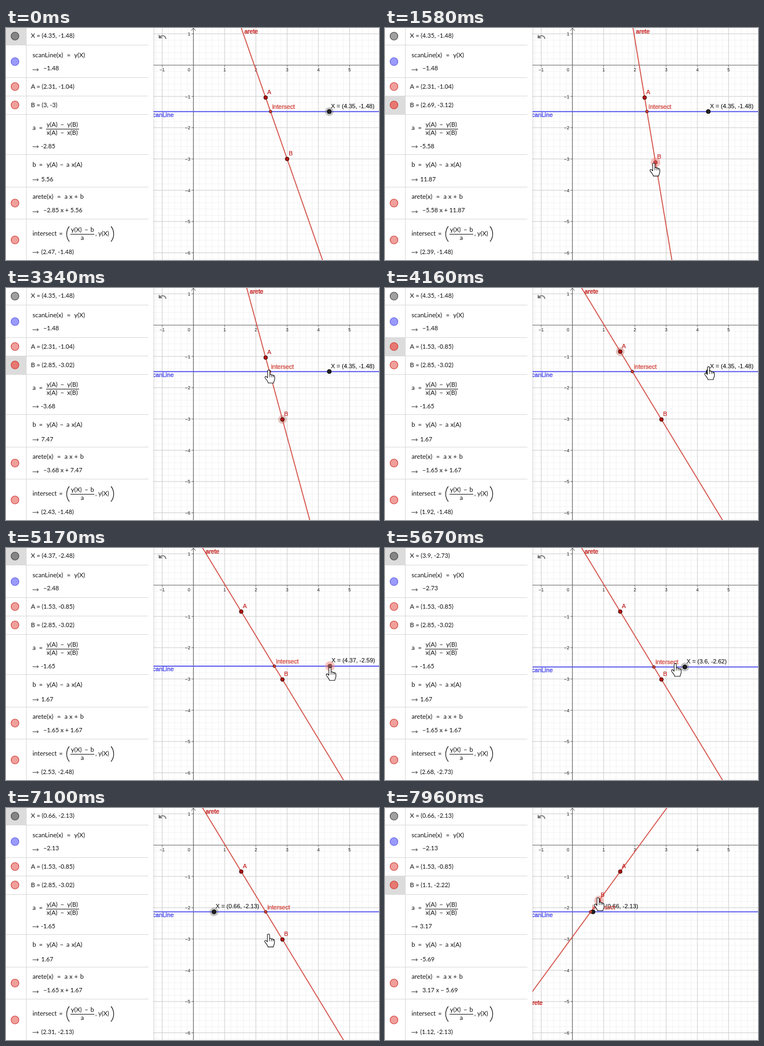
Animation of 689x428 px, one loop 8000 ms. Source, as an HTML page:

```html
<!DOCTYPE html>
<html lang="en">
<head>
<meta charset="utf-8">
<title>Scan line</title>
<style>
html, body { margin: 0; width: 100%; height: 100%; overflow: hidden; background: #fff; }
svg { display: block; width: 689px; height: 428px; }
.tick { font: 8.5px "Liberation Sans", Arial, sans-serif; fill: #222; }
.label { font: 11.1px "Liberation Sans", Arial, sans-serif; }
.math { font: 11.7px Lato, "Open Sans", sans-serif; fill: #111; }
.value { font-size: 11.3px; }
</style>
</head>
<body>
<svg id="stage" viewBox="0 0 689 428"></svg>
<script>
const LOOP = 8000, STEP = 83.6, UNIT = 57.7, OX = 346.2, OY = 68.5, LEFT = 261;
const W = 689, H = 428;
const stage = document.getElementById('stage');

function el(tag, attrs, parent = stage) {
  const node = document.createElementNS('http://www.w3.org/2000/svg', tag);
  for (const k in attrs) node.setAttribute(k, attrs[k]);
  parent.appendChild(node);
  return node;
}
function set(node, attrs) { for (const k in attrs) node.setAttribute(k, attrs[k]); }
function line(x1, y1, x2, y2, stroke, width = 1) {
  return el('line', { x1, y1, x2, y2, stroke, 'stroke-width': width });
}
function text(cls, x, y, str = '', attrs = {}) {
  const node = el('text', { class: cls, x, y, ...attrs });
  node.textContent = str;
  return node;
}
function path(d, stroke, width, fill = 'none', parent = stage) {
  return el('path', { d, stroke, 'stroke-width': width, fill, 'stroke-linejoin': 'round' }, parent);
}
const px = p => ({ x: OX + p.x * UNIT, y: OY - p.y * UNIT });
const num = v => String(+v.toFixed(2));
const minus = s => s.replace('-', '−');
const pair = p => `(${num(p.x)}, ${num(p.y)})`;

// ---- motion: [step, x, y] ----
const tracks = {
  A: [[41, 2.3122, -1.0375], [44, 1.9, -0.93], [47, 1.5305, -0.8455]],
  B: [[11, 3, -3], [18, 2.6853, -3.12], [19, 2.66, -3.11], [20, 2.615, -3.13],
      [24, 2.58, -3.15], [29, 2.62518, -3.1445], [30, 2.685, -3.11], [31, 2.773, -3.07],
      [36, 2.85, -3.0167], [86, 2.85, -3.0167], [89, 2.55, -3.05], [91, 2, -2.95],
      [92, 1.72, -2.8], [93, 1.38, -2.52], [94, 1.098, -2.2154], [95, 0.85, -1.774], [96, 0.83, -1.68]],
  X: [[53, 4.35, -1.484], [61, 4.37, -2.484], [62, 4.37, -2.59], [63, 4.38, -2.63],
      [66, 4.2, -2.85], [69, 3.3, -2.5], [73, 2.19, -2.1], [74, 2.19, -2.1],
      [75, 1.906, -2.097], [80, 0.66, -2.133]]
};
const approach = [[0, 526, 445], [1, 526, 415], [6, 522, 250], [8, 520, 216], [9, 521, 240], [11, 519, 243]];
const drags = [['B', 11, 36], ['A', 41, 47], ['X', 52, 81], ['B', 86, 97]];
const picks = [[0, 'X'], [12, 'B'], [41, 'A'], [52, 'X'], [86, 'B']];

function at(keys, f) {
  if (f <= keys[0][0]) return { x: keys[0][1], y: keys[0][2] };
  for (let i = 1; i < keys.length; i++) {
    const [f1, x1, y1] = keys[i], [f0, x0, y0] = keys[i - 1];
    if (f <= f1) {
      const k = (f - f0) / (f1 - f0);
      return { x: x0 + (x1 - x0) * k, y: y0 + (y1 - y0) * k };
    }
  }
  const end = keys[keys.length - 1];
  return { x: end[1], y: end[2] };
}
const mix = (a, b, k) => ({ x: a.x + (b.x - a.x) * k, y: a.y + (b.y - a.y) * k });
const dragAt = f => drags.find(d => f >= d[1] && f <= d[2]);

// The hand runs one step ahead of the point it drags.
function handAt(f) {
  if (f < 11) return at(approach, f);
  const d = dragAt(f);
  if (d) return px(at(tracks[d[0]], f + 1));
  const i = drags.findIndex(g => g[1] > f);
  const [n0, , f0] = drags[i - 1], [n1, f1] = drags[i];
  const from = px(at(tracks[n0], f0)), to = px(at(tracks[n1], f1));
  if (n1 === 'X') {
    const k = Math.min(1, (f - f0) / 3);
    return mix(from, { x: 598, y: 145 }, k);
  }
  return mix(from, to, (f - f0) / (f1 - f0));
}
function solve(f) {
  const s = { A: at(tracks.A, f), B: at(tracks.B, f), X: at(tracks.X, f) };
  s.a = (s.A.y - s.B.y) / (s.A.x - s.B.x);
  s.b = s.A.y - s.a * s.A.x;
  s.I = { x: (s.X.y - s.b) / s.a, y: s.X.y };
  return s;
}

// ---- graph ----
el('rect', { width: W, height: H, fill: '#fff' });
for (let i = -7; i <= 32; i++) {
  const x = OX + i * UNIT / 5, y = OY + i * UNIT / 5;
  if (i % 5 === 0) continue;
  line(x, 0, x, H, '#f2f2f2');
  line(LEFT, y, W, y, '#f2f2f2');
}
for (let i = -1; i <= 6; i++) {
  const x = OX + i * UNIT, y = OY + i * UNIT;
  line(x, 0, x, H, '#cbcbcb');
  line(LEFT, y, W, y, '#cbcbcb');
}
line(OX, 0, OX, H, '#555');
line(LEFT, OY, W, OY, '#666');
path(`M${OX - 4} 5L${OX} 0L${OX + 4} 5`, '#555', 1);
for (let i = -1; i <= 6; i++) {
  const x = OX + i * UNIT, y = OY + i * UNIT;
  if (!i) continue;
  line(x, OY, x, OY + 3, '#666');
  line(OX - 3, y, OX, y, '#666');
  if (i < 6) text('tick', x, 80, minus(String(i)), { 'text-anchor': 'middle' });
  text('tick', 340.5, y + 3.3, minus(String(-i)), { 'text-anchor': 'end' });
}
text('tick', 340.5, 80, '0', { 'text-anchor': 'end' });

const RED = '#d5554d', DARK = '#c3201f', BLUE = '#4c4cec';
const scan = line(LEFT, 0, W, 0, '#5c5cf0', 2);
const edge = line(0, 0, 0, 0, RED, 1.8);
const halo = el('circle', { r: 8 });
function dot(r, fill, stroke) { return el('circle', { r, fill, stroke, 'stroke-width': 1 }); }
const dots = {
  X: dot(3.8, '#222', '#000'),
  A: dot(3.5, '#b31414', '#300'),
  B: dot(3.5, '#b31414', '#300'),
  I: dot(2.6, '#d8443c', '#501010')
};
function label(str, fill, weight) { return text('label', 0, 0, str, { fill, stroke: fill, 'stroke-width': weight }); }
const labels = {
  X: label('', '#111', .1), A: label('A', DARK, .2), B: label('B', DARK, .2), I: label('intersect', RED, .45),
  scan: label('scanLine', BLUE, .45), edge: label('arete', DARK, .45)
};
const press = el('circle', { r: 9, fill: '#f0807a', 'fill-opacity': .5 });

path('M282 12V19H289Z', 'none', 0, '#777');
path('M284 17C288 12.5 294 13.5 295.5 20', '#777', 2);

// ---- side panel ----
const fade = el('linearGradient', { id: 'fade' }, el('defs', {}));
el('stop', { offset: 0, 'stop-color': '#000', 'stop-opacity': .2 }, fade);
el('stop', { offset: 1, 'stop-color': '#000', 'stop-opacity': 0 }, fade);
el('rect', { x: 272, width: 3, height: H, fill: 'url(#fade)' });
el('rect', { width: 272.5, height: H, fill: '#fff' });

const cells = {};
function cell(name, y, h) { cells[name] = el('rect', { y, width: 37, height: h, fill: '#dcdcdc' }); }
cell('X', 0, 31);
cell('A', 91, 34);
cell('B', 125, 34);
for (const y of [31, 91, 125, 159, 233, 293, 352]) line(0, y + .5, 263, y + .5, '#d8d8d8');
line(37.5, 0, 37.5, H, '#d8d8d8');

function marble(y, fill, stroke) { return el('circle', { cx: 16.6, cy: y, r: 7.2, fill, stroke, 'stroke-width': 1.1 }); }
const marbles = { X: marble(15, '#a0a0a0', '#444') };
marble(62, '#9a9aff', '#5c5ce0');
marbles.A = marble(108, '#f0a09c', '#cf3832');
marbles.B = marble(142, '#f0a09c', '#cf3832');
marble(323, '#f0a09c', '#cf3832');
marble(391, '#f0a09c', '#cf3832');
const tone = { X: ['#a0a0a0', '#858585'], A: ['#f0a09c', '#e67972'], B: ['#f0a09c', '#e67972'] };

// Places alternating x positions and strings on one baseline.
function row(y, ...parts) {
  for (let i = 0; i < parts.length; i += 2) text('math', parts[i], y, parts[i + 1]);
}
function arrow(y) { path(`M49 ${y}H60M57 ${y - 2.3}L60 ${y}L57 ${y + 2.3}`, '#333', 1); }
const bar = (x1, x2, y) => line(x1, y, x2, y, '#111');

row(18, 46, 'X', 56.5, '=');
row(54, 49, 'scanLine(x)', 112.5, '=', 126, 'y(X)');
row(112, 46, 'A', 56.5, '=');
row(146, 46, 'B', 56.5, '=');
row(188, 49, 'a', 61, '=');
row(182, 75, 'y(A)', 100.5, '−', 113, 'y(B)');
bar(74, 135, 186.5);
row(197, 75, 'x(A)', 100.5, '−', 113, 'x(B)');
row(256, 49, 'b', 61, '=', 75, 'y(A)', 99.5, '−', 111.5, 'a', 121, 'x(A)');
row(315, 49, 'arete(x)', 94.5, '=', 108, 'a', 117, 'x', 126, '+', 137, 'b');
row(383, 49, 'intersect', 98, '=', 165, ',', 170.5, 'y(X)');
row(376, 120, 'y(X)', 145, '−', 156, 'b');
bar(119, 163, 380.5);
row(391, 138, 'a');
path('M117 366C110.5 374 110.5 386 117 394', '#111', 1.2);
path('M194 366C200.5 374 200.5 386 194 394', '#111', 1.2);
[77, 219, 280, 339, 414].forEach(arrow);

const value = (x, y) => text('math value', x, y);
const out = {
  X: value(66, 18), scan: value(69, 78), A: value(66, 112), B: value(66, 146),
  a: value(64.5, 222), b: value(65, 283), edge: value(69, 340), I: value(65, 417)
};

// ---- pointer ----
const hand = el('g', {});
path('M-2 1.5C-2-1 2-1 2 1.5V9C2 7 5.5 7 5.5 9.5C5.5 8 8.5 8 8.5 10.5C8.5 9 11 9.5 11 12V16C11 19 9 20 9 23.5H-1C-1 21-4 18-6.5 14.5C-8 12-5.5 10.5-4 12L-2 14Z', '#111', 1.1, '#fff', hand);
path('M2 9V13M5.5 9.5V13M8.5 10.5V13', '#111', .9, 'none', hand);

function draw(t) {
  const f = Math.floor((t + 22) / STEP);
  const s = solve(f), old = solve(Math.max(0, f - 1));
  const picked = picks.filter(p => p[0] <= f).pop()[1];
  const P = { A: px(s.A), B: px(s.B), X: px(s.X), I: px(s.I) };

  set(scan, { y1: P.X.y, y2: P.X.y });
  const xAt = y => P.A.x - (y - P.A.y) / s.a;
  set(edge, { x1: xAt(-10), y1: -10, x2: xAt(H + 10), y2: H + 10 });

  for (const n in dots) {
    set(dots[n], { cx: P[n].x, cy: P[n].y });
    set(labels[n], { x: P[n].x + 3, y: P[n].y - (n === 'I' ? 5 : 6.5) });
  }
  labels.X.textContent = 'X = ' + pair(s.X);
  set(labels.scan, { x: LEFT + 4.5, y: P.X.y + 9.5 });
  const yLeft = P.A.y - s.a * (LEFT - P.A.x);
  if (yLeft > 0) set(labels.edge, { x: LEFT + 5, y: yLeft + 8.5 });
  else set(labels.edge, { x: xAt(0) + 5.5, y: 10 });

  const tip = handAt(f), drag = dragAt(f), p = P[picked];
  const held = drag && drag[0] === picked && Math.hypot(tip.x - p.x, tip.y - p.y) < 12;
  set(halo, {
    cx: p.x, cy: p.y, fill: picked === 'X' ? '#666' : '#b86058', 'fill-opacity': .38,
    visibility: held ? 'hidden' : 'visible'
  });
  set(press, { cx: p.x, cy: p.y, visibility: held ? 'visible' : 'hidden' });
  set(hand, { transform: `translate(${tip.x - .5} ${tip.y + .5})` });

  for (const n in cells) {
    const on = n === picked;
    set(cells[n], { visibility: on ? 'visible' : 'hidden' });
    set(marbles[n], { fill: tone[n][+on] });
  }
  for (const n of ['X', 'A', 'B']) out[n].textContent = pair(old[n]);
  out.scan.textContent = minus(num(old.X.y));
  out.a.textContent = num(old.a);
  out.b.textContent = num(old.b);
  out.edge.textContent = `${minus(num(old.a))} x ${old.b < 0 ? '−' : '+'} ${num(Math.abs(old.b))}`;
  out.I.textContent = pair(old.I);
}

const start = performance.now();
function tick() {
  draw((performance.now() - start) % LOOP);
  requestAnimationFrame(tick);
}
draw(0);
requestAnimationFrame(tick);
</script>
</body>
</html>
```
